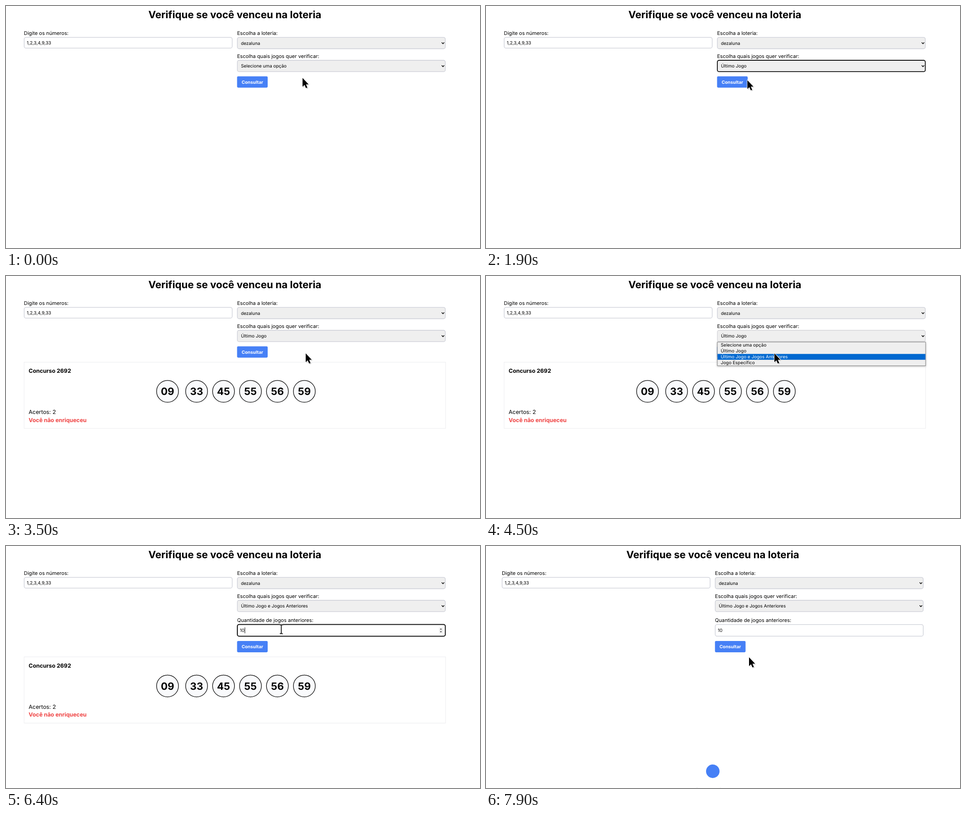
Recreate the animation shown at these times as an HTML page. Size 1047x535 px, loop 8 s.

```html
<!DOCTYPE html>
<html lang="pt-BR">
<head>
<meta charset="utf-8">
<title>Verificador de loteria</title>
<style>
  html, body { margin: 0; width: 100%; height: 100%; overflow: hidden; background: #fff; }
  svg { display: block; width: 100%; height: 100%; }
  text {
    font-family: Inter, "Open Sans", sans-serif;
    font-optical-sizing: none;
    text-rendering: geometricPrecision;
    white-space: pre;
  }
</style>
</head>
<body>
<svg id="stage" viewBox="0 0 1047 535"></svg>
<script>
const LOOP = 8000, STEP = 100;
const BASE = 9.92, LABEL = 11.16, CARD = 12.4, TITLE = 22.32;
const BLUE = '#4680f6', DARK_BLUE = '#304dd8', GREY = '#cbcdd6', FIELD = '#efefef';
const LEFT = 40, RIGHT = 510.8, WIDTH = 460;
const OPTIONS = ['Selecione uma opção', 'Último Jogo', 'Último Jogo e Jogos Anteriores', 'Jogo Específico'];
const BALLS = ['09', '33', '45', '55', '56', '59'];

// Pointer path: time, x, y
const PATH = [
  [0, 655, 159], [300, 655, 159], [500, 635, 142], [600, 635, 142], [900, 632, 132],
  [1000, 632, 132], [1200, 620, 160], [1500, 620, 160], [2100, 556, 166], [2200, 556, 166],
  [2400, 590, 215], [2599, 590, 215], [2600, 677, 316], [3400, 677, 316], [3500, 662, 171],
  [3900, 632, 126], [4000, 632, 126], [4500, 637, 171], [4600, 637, 171], [5500, 608, 184],
  [6900, 608, 184], [7300, 556, 221], [7400, 558, 225], [7600, 556, 224], [7700, 556, 224],
  [7900, 581, 246], [8000, 581, 246]
];

const within = (t, a, b) => t >= a && t < b;

function pointerAt(t) {
  const i = Math.max(1, PATH.findIndex(p => p[0] >= t));
  const [t0, x0, y0] = PATH[i - 1], [t1, x1, y1] = PATH[i];
  const k = (t - t0) / (t1 - t0);
  return [x0 + (x1 - x0) * k, y0 + (y1 - y0) * k];
}

function text(x, y, str, size = BASE, extra = '') {
  return `<text x="${x}" y="${y}" font-size="${size}" ${extra}>${str}</text>`;
}

function rect(x, y, w, h, fill, extra = '') {
  return `<rect x="${x}" y="${y}" width="${w}" height="${h}" fill="${fill}" ${extra}/>`;
}

function group(x, y, body) {
  return `<g transform="translate(${x} ${y})">${body}</g>`;
}

function box(x, y, h, fill, stroke = GREY, line = 1.3) {
  return rect(x, y, WIDTH - 0.6, h, fill, `rx="4" stroke="${stroke}" stroke-width="${line}"`);
}

function select(y, value, state) {
  const stroke = { open: '#d3d3d8', focus: '#101010' }[state] || GREY;
  return box(RIGHT + 0.2, y, 25.2, FIELD, stroke, state === 'focus' ? 1.8 : 1.3) +
    text(518.9, y + 16.2, value) +
    `<path d="M962.4 ${y + 11.2}l2.8 2.9 2.8-2.9" fill="none" stroke="#000" stroke-width="1.5"/>`;
}

function amountField(focused, value, caret, spinner) {
  let out = text(RIGHT - 0.4, 168, 'Quantidade de jogos anteriores:', LABEL) +
    box(RIGHT + 0.2, 173.6, 25.8, '#fff', focused ? '#101010' : GREY, focused ? 2 : 1.3);
  out += value
    ? text(516.6, 190.1, value)
    : text(516.6, 190.1, 'Digite a quantidade de jogos', BASE, 'fill="#9ca3af"');
  if (caret) out += rect([516.2, 521.4, 527.2][value.length], 180, 1, 13, '#000');
  if (spinner) {
    out += rect(956.5, 180, 9, 13.2, FIELD) +
      '<path d="M958.4 184.8l2.2-2.7 2.2 2.7zM958.4 188.6l2.2 2.7 2.2-2.7z" fill="#444"/>';
  }
  return out;
}

function button(y, hover) {
  return rect(510.4, y, 67.6, 25, hover ? DARK_BLUE : BLUE, 'rx="2.4"') +
    text(544.2, y + 16.4, 'Consultar', BASE, 'fill="#fff" font-weight="700" text-anchor="middle"');
}

function menu(active) {
  const row = 12.9;
  let out = rect(511, 146, 460, 52.4, FIELD,
    'stroke="#767676" stroke-width="0.9" style="filter:drop-shadow(0 1.5px 2px rgba(0,0,0,.28))"');
  OPTIONS.forEach((name, i) => {
    const on = i === active, y = 146.5 + row * i;
    if (on) out += rect(511.4, y, 459.2, row, '#0068d0');
    out += text(518.5, y + 9.8, name, BASE, on ? 'fill="#fff"' : '');
  });
  return out;
}

function result() {
  const balls = BALLS.map((n, i) => {
    const x = i ? 421 + 59.5 * (i - 1) : 356.8;
    return `<circle cx="${x}" cy="255" r="24.2" fill="#f9fafc" stroke="#000" stroke-width="1.3"/>` +
      text(x, 263.1, n, TITLE, 'font-weight="700" text-anchor="middle"');
  }).join('');
  return rect(40, 190.6, 931, 146.4, 'none', 'stroke="#e8e9ed" stroke-width="0.9"') +
    text(50, 214, 'Concurso 2692', CARD, 'font-weight="700"') + balls +
    text(50, 305.4, 'Acertos: 2', CARD) +
    text(50, 322.7, 'Você não enriqueceu', CARD, 'font-weight="700" fill="#ef4444"');
}

function loader() {
  return `<circle cx="505.6" cy="443.5" r="14.9" fill="${BLUE}"/>` +
    text(505.6, 488, 'Carregando....', LABEL, 'font-weight="600" fill="#374151" text-anchor="middle"');
}

function pointer(t) {
  const [x, y] = pointerAt(t);
  if (within(t, 4700, 7100)) {
    const d = 'M-3.2-9.6H-1Q0-9.6 0-8.4Q0-9.6 1-9.6H3.2M0-8.6V8.6M-3.2 9.6H-1Q0 9.6 0 8.4Q0 9.6 1 9.6H3.2';
    const beam = (color, w) => `<path d="${d}" fill="none" stroke="${color}" stroke-width="${w}"/>`;
    return group(x + 1.4, y + 1.4, beam('rgba(0,0,0,.2)', 2)) +
      group(x, y, beam('#fff', 3.4) + beam('#000', 1.6));
  }
  const d = 'M0 0V19.6L4.4 15.5L7.5 22.6L10.7 21.2L7.6 14.2H13.4Z';
  return group(x + 1.8, y + 1.6, `<path d="${d}" fill="rgba(0,0,0,.25)"/>`) +
    group(x, y, `<path d="${d}" stroke="#fff" stroke-width="1.8" stroke-linejoin="round" paint-order="stroke"/>`);
}

function scene(t) {
  const open = within(t, 700, 1600) || within(t, 4100, 4600);
  const ring = within(t, 1600, 2200) || within(t, 4600, 5400);
  const loading = within(t, 2200, 2600) || t >= 7800;
  const hover = within(t, 2000, 2600) || within(t, 7300, 7900);
  const chosen = t < 1600 ? 0 : t < 4600 ? 1 : 2;
  const extra = t >= 4600;
  const drop = extra ? 54.5 : 0;

  let page = text(505.5, 27.1, 'Verifique se você venceu na loteria', TITLE, 'font-weight="700" text-anchor="middle"') +
    text(39.6, 63.8, 'Digite os números:', LABEL) +
    box(LEFT + 0.2, 69.4, 23.8, '#fff') +
    text(45.8, 84.9, '1,2,3,4,9,33') +
    text(RIGHT - 0.4, 63.8, 'Escolha a loteria:', LABEL) +
    select(69.3, 'dezaluna') +
    text(RIGHT - 0.4, 114.7, 'Escolha quais jogos quer verificar:', LABEL) +
    select(120, OPTIONS[chosen], open ? 'open' : ring ? 'focus' : '');

  if (extra) {
    const focused = within(t, 5400, 7800);
    const value = t < 6300 ? '' : t < 6400 ? '1' : '10';
    const caret = focused && !within(t, 6100, 6300) && !within(t, 7000, 7500);
    page += amountField(focused, value, caret, within(t, 4700, 7800));
  }
  page += button(155.4 + drop, hover);
  if (loading) page += group(0, drop, loader());
  else if (t >= 2600) page += group(0, drop, result());
  if (open) page += menu(t < 1200 ? 0 : t < 4500 ? 1 : 2);

  // A scrollbar narrows the page while loading
  return group(loading ? -4.65 : 0, 0, page) + pointer(t);
}

const stage = document.getElementById('stage');
let shown = -1;

function tick() {
  const t = Math.floor(performance.now() % LOOP / STEP) * STEP;
  if (t !== shown) {
    shown = t;
    stage.innerHTML = scene(t);
  }
  requestAnimationFrame(tick);
}
tick();
</script>
</body>
</html>
```
